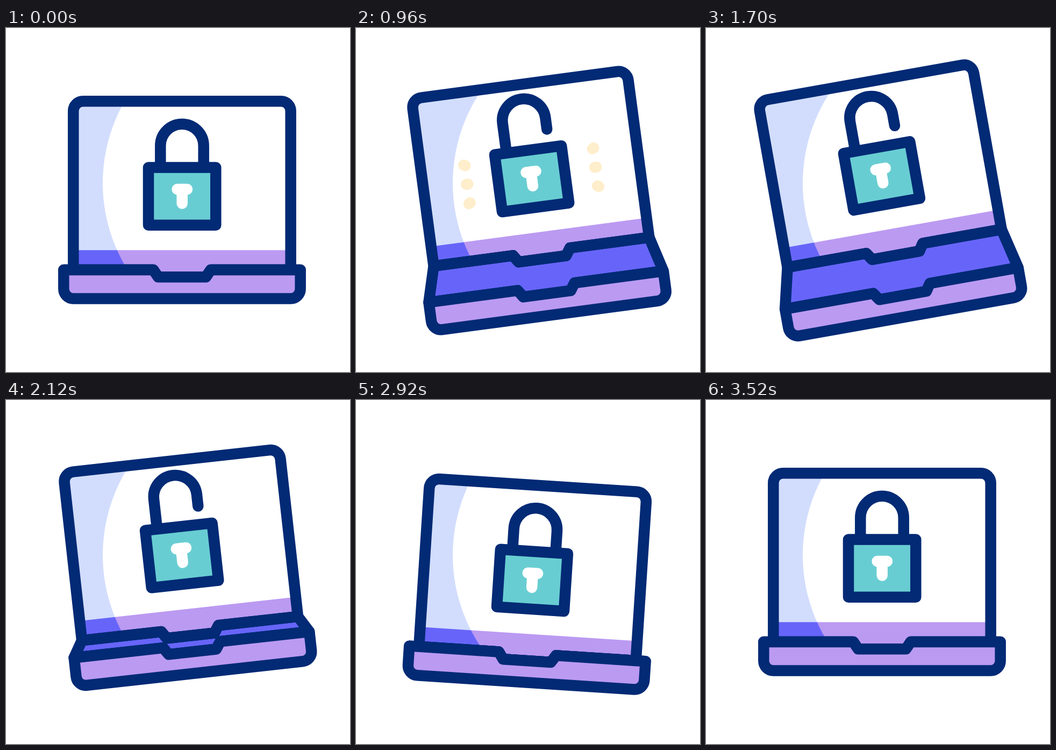
An HTML page with a canvas for the animation above (3600 ms loop, 640 px wide and 640 px high).

```html
<!DOCTYPE html>
<html lang="en">
<head>
<meta charset="utf-8">
<title>Laptop unlock</title>
<style>
  html, body { margin: 0; width: 100%; height: 100%; overflow: hidden; background: #fff; }
  canvas { display: block; width: 640px; height: 640px; }
</style>
</head>
<body>
<canvas id="stage" width="640" height="640"></canvas>
<script>
const ctx = document.getElementById('stage').getContext('2d');
const LOOP = 3600, STEP = 20, WIDTH = 20.5;
const NAVY = '#022a75', PURPLE = '#bb9af2', BLUE = '#6765f9',
      PALE = '#d2ddfd', TEAL = '#68cdd2', CREAM = '#ffeecb', WHITE = '#fff';
const CENTER = { x: 327.5, y: 313.4 };

const progress = (t, start, end) => Math.min(1, Math.max(0, (t - start) / (end - start)));
const ease = (t, start, end) => (1 - Math.cos(Math.PI * progress(t, start, end))) / 2;
const easeOut = (t, start, end) => Math.sin(Math.PI / 2 * progress(t, start, end));

// Open, drift further, swing back past level, then settle.
function poseAt(t) {
  const open = ease(t, 100, 640);
  const drift = ease(t, 820, 1720);
  return {
    tilt: -5.7 * open - 4.4 * easeOut(t, 640, 1780) + 18.2 * ease(t, 1840, 2770)
      - 12.1 * ease(t, 2730, 3192) + 4 * ease(t, 3192, 3520),
    rise: -32.2 * open - 5.8 * drift + 66.4 * ease(t, 1886, 2657) - 28.4 * ease(t, 2660, 3500),
    gap: 65 * ease(t, 350, 640) + 10.7 * drift - 75.7 * ease(t, 1958, 2245),
    unlock: ease(t, 660, 880) - ease(t, 2340, 2560),
    rayHead: ease(t, 740, 860),
    rayTail: ease(t, 830, 1000)
  };
}

function stroke(path, color = NAVY) {
  ctx.strokeStyle = color;
  ctx.stroke(path);
}

function fill(path, color) {
  ctx.fillStyle = color;
  ctx.fill(path);
}

function line(x1, y1, x2, y2, color) {
  const path = new Path2D();
  path.moveTo(x1, y1);
  path.lineTo(x2, y2);
  stroke(path, color);
}

// Front edge with the finger notch, from left to right.
function edge(halfWidth, dy = 0) {
  const y = 450 + dy, side = 53.5, inner = 44.5;
  return [[-halfWidth, y], [-side, y], [-inner, y + 13.3], [inner, y + 13.3], [side, y], [halfWidth, y]]
    .map(([x, py]) => [CENTER.x + x, py]);
}

function polygon(points) {
  const path = new Path2D();
  points.forEach(([x, y]) => path.lineTo(x, y));
  path.closePath();
  return path;
}

// The notched edge joined to a far side with two rounded corners.
function shell(halfWidth, far, dy = 0) {
  const left = CENTER.x - halfWidth, right = CENTER.x + halfWidth;
  const path = new Path2D();
  edge(halfWidth, dy).forEach(([x, y]) => path.lineTo(x, y));
  path.arcTo(right, far, left, far, 18);
  path.arcTo(left, far, left, 450 + dy, 18);
  path.closePath();
  return path;
}

const LID_HALF = 202.2, BASE_HALF = 220.2;
const lid = shell(LID_HALF, 136.3);

function fillScreen(top, bottom) {
  ctx.fillStyle = top;
  ctx.fillRect(110, 120, 440, 294);
  ctx.fillStyle = bottom;
  ctx.fillRect(110, 413.3, 440, 60);
}

// The shade's curved border stays fixed to the stage while the lid moves.
function drawScreen() {
  ctx.save();
  ctx.clip(lid);
  fillScreen(WHITE, PURPLE);
  const pose = ctx.getTransform();
  const shade = new Path2D();
  shade.rect(0, 0, 640, 640);
  shade.arc(486, 288.5, 306, 0, Math.PI * 2);
  ctx.resetTransform();
  ctx.clip(shade, 'evenodd');
  ctx.setTransform(pose);
  fillScreen(PALE, BLUE);
  ctx.restore();
}

function drawLock(unlock) {
  const arcY = 219 - 15.5 * unlock, radius = 40.2;
  const shackle = new Path2D();
  shackle.moveTo(CENTER.x - radius, 259);
  shackle.arc(CENTER.x, arcY, radius, Math.PI, 0);
  shackle.lineTo(CENTER.x + radius, arcY + 40 - 18 * unlock);
  stroke(shackle);

  const body = new Path2D();
  body.rect(265, 259.5, 125.3, 107.3);
  fill(body, TEAL);
  stroke(body);
  line(318.6, 300, 337, 300, WHITE);
  line(327.7, 300, 327.7, 326.5, WHITE);
}

function drawRays(head, tail) {
  if (head <= tail) return;
  for (const side of [-1, 1]) {
    for (const row of [-1, 0, 1]) {
      const angle = row * Math.PI / 6;
      const point = k => [
        CENTER.x + side * (122 - 24 * (1 - k) * Math.cos(angle)),
        CENTER.y - 6 + row * 36.3 - 24 * (1 - k) * Math.sin(angle)
      ];
      line(...point(tail), ...point(head), CREAM);
    }
  }
}

function draw(t) {
  const { tilt, rise, gap, unlock, rayHead, rayTail } = poseAt(t);
  ctx.resetTransform();
  ctx.fillStyle = WHITE;
  ctx.fillRect(0, 0, 640, 640);
  ctx.lineWidth = WIDTH;
  ctx.lineCap = ctx.lineJoin = 'round';
  ctx.translate(CENTER.x + tilt * 0.07, CENTER.y + rise);
  ctx.rotate(tilt * Math.PI / 180);
  ctx.translate(-CENTER.x, -CENTER.y);

  drawScreen();
  drawRays(rayHead, rayTail);
  drawLock(unlock);

  const deck = polygon([...edge(LID_HALF), ...edge(BASE_HALF, gap).reverse()]);
  fill(deck, BLUE);
  stroke(lid);
  stroke(deck);

  const base = shell(BASE_HALF, 503.6 + gap, gap);
  fill(base, PURPLE);
  stroke(base);
}

function tick() {
  const t = performance.now() % LOOP;
  draw(Math.floor(t / STEP) * STEP);
  requestAnimationFrame(tick);
}
tick();
</script>
</body>
</html>
```
